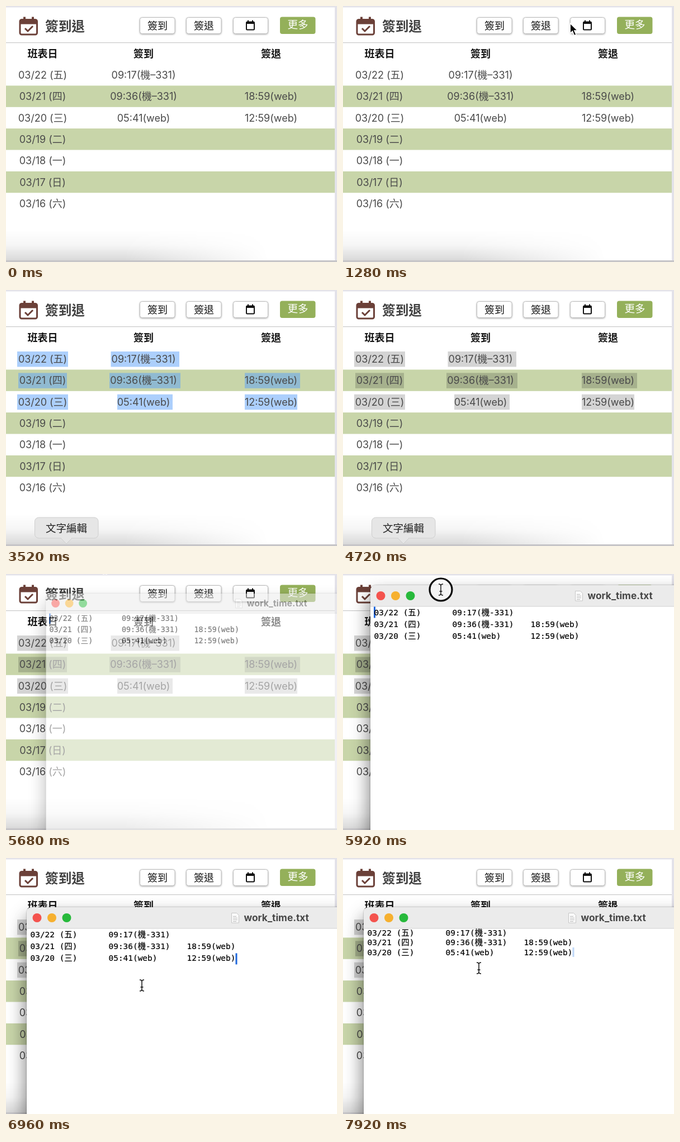
Animation, 592 px wide and 458 px high, one loop 8000 ms. Source, as an HTML page:

```html
<!DOCTYPE html>
<html lang="zh-Hant">
<head>
<meta charset="utf-8">
<title>簽到退</title>
<style>
  html, body { margin: 0; width: 100%; height: 100%; overflow: hidden; background: #fff; }
  svg { display: block; width: 592px; height: 458px; }
  text { font-family: Inter, "Noto Sans CJK TC", "Noto Sans CJK JP", sans-serif; white-space: pre; }
  .mono text { font: 14.45px "DejaVu Sans Mono", "Noto Sans CJK TC", "Noto Sans CJK JP", monospace; fill: #000; stroke: #000; stroke-width: .2; }
  .button { fill: #fff; stroke: #bcbcbc; filter: drop-shadow(0 1px 1.5px #0005); }
  .frame { filter: drop-shadow(0 18px 17px rgba(0, 0, 0, .42)) drop-shadow(0 0 1px rgba(0, 0, 0, .4)); }
  .bubble rect, .bubble path { fill: #e6e6e6; stroke: #cecece; }
</style>
</head>
<body>
<svg viewBox="0 0 592 458">
  <defs>
    <linearGradient id="rise" x2="0" y2="1">
      <stop offset="0" stop-color="#000" stop-opacity="0"/>
      <stop offset=".5" stop-color="#000" stop-opacity=".035"/>
      <stop offset="1" stop-color="#000" stop-opacity=".15"/>
    </linearGradient>
    <linearGradient id="fade">
      <stop offset=".45" stop-color="#fff"/>
      <stop offset="1" stop-color="#fff" stop-opacity="0"/>
    </linearGradient>
    <mask id="side"><rect y="395" width="470" height="62" fill="url(#fade)"/></mask>
  </defs>

  <rect width="592" height="458" fill="#e3e2e9"/>
  <rect y="2.5" width="588" height="452.5" fill="#fff"/>
  <rect y="400" width="470" height="55" fill="url(#rise)" mask="url(#side)"/>
  <rect y="455" width="592" height="3" fill="#c6c5c8"/>
  <rect y="65" width="588" height="1.2" fill="#c8c8c8"/>
  <g id="stripes" fill="#c8d5a9"></g>
  <g id="marks"></g>

  <g fill="none" stroke="#6b4038" stroke-width="3">
    <rect x="25" y="24.5" width="30.5" height="26.5" rx="3"/>
    <path d="M25 29h30.5" stroke-width="7"/>
    <path d="M33 19.5v6M48 19.5v6" stroke-width="4"/>
    <path d="M34 40l5 5 9-9"/>
  </g>
  <rect class="button" x="239.5" y="20.5" width="62.5" height="29" rx="4"/>
  <rect class="button" x="322.5" y="20.5" width="62.5" height="29" rx="4"/>
  <rect class="button" x="406.5" y="20.5" width="62" height="29" rx="4"/>
  <rect x="490" y="19.5" width="63.5" height="30.5" rx="4" fill="#94b05a"/>
  <g fill="none" stroke="#111" stroke-width="2">
    <rect x="430" y="28.5" width="14" height="14" rx="1.5"/>
    <path d="M430 30h14" stroke-width="4"/>
    <path d="M433 25.5v4M441 25.5v4"/>
  </g>
  <g id="labels"></g>

  <g id="otherTip" class="bubble">
    <rect x="-57.5" y="407" width="114" height="37" rx="7"/>
  </g>
  <g id="editTip" class="bubble">
    <path d="M97 443l11 11 11-11"/>
    <rect x="51.5" y="407" width="113.5" height="37" rx="7"/>
    <path d="M99 443h18v2h-18z" style="stroke:none"/>
  </g>

  <g id="window">
    <rect id="frame" class="frame" width="720" height="620" rx="10" fill="#fff"/>
    <path d="M0 38V10Q0 0 10 0H720V38z" fill="#ebebeb"/>
    <rect y="37.5" width="720" height="1" fill="#d2d2d2"/>
    <g id="lights">
      <circle cx="18.5" cy="19" r="8"/><circle cx="45" cy="19" r="8"/><circle cx="71.5" cy="19" r="8"/>
    </g>
    <circle id="dirtyDot" cx="18.5" cy="19" r="3" fill="#7c1411"/>
    <path d="M366.500 10.500h9l4 4v13.500h-13z" fill="#fafafa" stroke="#c6c6c6"/>
    <path d="M369 16.500h6M369 19.500h8M369 22.500h8M369 25.500h6" stroke="#b8b8b8"/>
    <g id="titleBar"></g>
    <rect id="caret" width="3"/>
    <g id="note" class="mono"></g>
  </g>

  <circle id="ring" r="20" fill="#fff" fill-opacity=".45" stroke="#0a0a0a" stroke-width="3.2"/>
  <g id="pointer">
    <path id="arrow" d="M0 0v17.500l4-3.800 3.300 7.800 3.200-1.400-3.300-7.500h5.600z" fill="#000" stroke="#fff" stroke-width="1.300"/>
    <g id="beam" fill="none">
      <path d="M-4-10q4 0 4 3v14q0 3-4 3M4-10q-4 0-4 3v14q0 3 4 3M-2.500 3h5" stroke="#fff" stroke-width="3.500"/>
      <path d="M-4-10q4 0 4 3v14q0 3-4 3M4-10q-4 0-4 3v14q0 3 4 3M-2.500 3h5" stroke="#111" stroke-width="1.500"/>
    </g>
  </g>
</svg>
<script>
const LOOP = 8000, STEP = 80;
const $ = id => document.getElementById(id);
const clamp = (v, lo, hi) => Math.min(hi, Math.max(lo, v));
const between = (t, a, b) => t >= a && t < b;

function add(parent, tag, attrs, content = '') {
  const el = document.createElementNS('http://www.w3.org/2000/svg', tag);
  for (const key in attrs) el.setAttribute(key, attrs[key]);
  el.textContent = content;
  return parent.appendChild(el);
}
function set(el, attrs) {
  for (const key in attrs) el.setAttribute(key, attrs[key]);
}
const show = (el, on) => { el.style.display = on ? '' : 'none'; };

// Text centred on (x, y)
function label(parent, content, x, y, size, fill, weight = 400) {
  return add(parent, 'text', {
    x, y: y + size * .37, 'font-size': size, fill, 'font-weight': weight, 'text-anchor': 'middle'
  }, content);
}

const labels = $('labels');
label(labels, '簽到退', 105.5, 36.5, 23.7, '#404040', 700);
label(labels, '簽到', 271, 35.5, 18, '#111', 500);
label(labels, '簽退', 354, 35.5, 18, '#111', 500);
label(labels, '更多', 522, 33.5, 18.5, '#fff');
const COLUMNS = [65.5, 246, 474];
['班表日', '簽到', '簽退'].forEach((s, i) => label(labels, s, COLUMNS[i], 85, 18, '#111', 700));

const ROW = 38.35, rowY = i => 123.3 + ROW * i;
[
  ['03/22 (五)', '09:17(機–331)', ''],
  ['03/21 (四)', '09:36(機–331)', '18:59(web)'],
  ['03/20 (三)', '05:41(web)', '12:59(web)'],
  ['03/19 (二)'], ['03/18 (一)'], ['03/17 (日)'], ['03/16 (六)']
].forEach((cells, i) => {
  if (i % 2) add($('stripes'), 'rect', { y: rowY(i) - 19.2, width: 588, height: ROW });
  cells.forEach((s, c) => label(labels, s, COLUMNS[c], rowY(i), 18, '#4a4a4a'));
});

// Selected cells: row, left, right
const marks = [
  [0, 20, 111], [0, 187.5, 310],
  [1, 22, 109], [1, 185, 312], [1, 427, 526],
  [2, 20, 111], [2, 199, 298], [2, 427, 521]
].map(([row, left, right]) => ({
  row, left, right,
  el: add($('marks'), 'rect', { y: rowY(row) - 13.3, height: 27.5 })
}));
const BLUE = 'rgba(90,160,250,.5)', GRAY = 'rgba(0,0,0,.17)';
const titleMark = add($('marks'), 'rect', { x: 70, y: 18, height: 36, fill: BLUE });

label($('editTip'), '文字編輯', 108, 426, 18.5, '#222');
label($('otherTip'), '計算機', 14, 426, 18.5, '#222');

add($('titleBar'), 'text', { x: 388.5, y: 24.5, 'font-size': 17.3, 'font-weight': 700, fill: '#474747' }, 'work_time.txt');
const edited = add($('titleBar'), 'text', { x: 513, y: 24.5, 'font-size': 16, fill: '#9a9a9a' }, '— 已編輯');

const noteLines = [
  ['03/22 (五)', '09:17(機-331)'],
  ['03/21 (四)', '09:36(機-331)', '18:59(web)'],
  ['03/20 (三)', '05:41(web)', '12:59(web)']
].map(cells => cells.map((s, i) => add($('note'), 'text', { x: 6.5 + 140 * i }, s)));

// Each entry: time, x, y
const POINTER = [
  [0, 40, -40], [80, 40, 12], [320, 20, 120], [560, 60, 300], [720, 250, 160],
  [880, 540, 45], [960, 535, 30], [1120, 490, 30], [1200, 490, 30],
  [1600, 72, 36], [1760, 143, 38], [2080, 504, 188], [2320, 519.5, 193.5],
  [2480, 547, 222], [2560, 547, 222], [2720, 400, 200], [2880, 200, 165],
  [3040, 10, 97], [3120, 17, 122], [3200, 17, 122], [3520, 108, 475],
  [3600, 108, 475], [3840, 60, 127], [4160, 30, 475], [4720, 100, 475],
  [5120, 20, -30], [5600, 178, -30], [5840, 175, 28], [5920, 175, 28],
  [6320, 161, 94], [6400, 168, 101], [6640, 243, 228], [7680, 243, 228],
  [7920, 243, 197], [8000, 243, 197]
];
const WINDOW = [[0, 49, 20], [5920, 49, 20], [6320, 37, 88], [8000, 37, 88]];

function at(track, t) {
  const i = Math.max(1, track.findIndex(k => k[0] >= t));
  const [t0, x0, y0] = track[i - 1], [t1, x1, y1] = track[i];
  const p = (t - t0) / (t1 - t0);
  return [x0 + (x1 - x0) * p, y0 + (y1 - y0) * p];
}

function drawSelection(t, x, y) {
  const titleWidth = t < 1600 || t >= 2480 ? 0 : t < 1760 ? clamp(x - 70, 0, 71) : 71;
  set(titleMark, { width: titleWidth });

  const row = t < 2640 ? 9 : t >= 3120 ? -1 : Math.floor((y - 104) / ROW);
  for (const m of marks) {
    const left = m.row > row ? m.left : m.row === row ? clamp(x, m.left, m.right) : m.right;
    set(m.el, { x: left, width: m.right - left, fill: t < 4720 ? BLUE : GRAY });
  }
}

function drawWindow(t) {
  const [x, y] = at(WINDOW, t);
  const open = clamp((t - 5520) / 320, 0, 1);
  const scale = .7 + .3 * (1 - (1 - open) ** 2);
  show($('window'), t >= 5600);
  set($('window'), {
    opacity: open,
    transform: `translate(${x + 300 * (1 - scale)} ${y + 200 * (1 - scale)}) scale(${scale})`
  });

  const inactive = between(t, 6880, 6960);
  ['#f4534e', '#f6b02f', '#27b93b'].forEach((c, i) =>
    set($('lights').children[i], { fill: inactive ? '#cfcfcf' : c }));

  const compact = t >= 7200;
  const first = compact ? 45.5 : 48.5, pitch = compact ? 17.5 : 21.2;
  noteLines.forEach((line, i) => line.forEach(el => set(el, { y: first + pitch * i + 5 })));

  const atEnd = t >= 6560;
  set($('caret'), {
    x: atEnd ? 373.5 : 6,
    y: atEnd ? first + pitch * 2 - 8.5 : 38.5,
    height: compact ? 17 : 20,
    fill: t >= 7920 ? '#bfd8f8' : '#1f68dc'
  });

  const dirty = clamp((t - 7120) / 320, 0, 1) * clamp((7920 - t) / 240, 0, 1);
  set(edited, { opacity: dirty });
  set($('dirtyDot'), { opacity: dirty });
}

function draw(time) {
  const t = Math.floor(time / STEP) * STEP;
  const [x, y] = at(POINTER, t);
  drawSelection(t, x, y);
  drawWindow(t);

  show($('editTip'), between(t, 3440, 3680) || between(t, 4560, 4800));
  show($('otherTip'), between(t, 4320, 4560));

  const beam = between(t, 1520, 3280) || between(t, 3840, 3920) || between(t, 5680, 6080) || t >= 6480;
  show($('beam'), beam);
  show($('arrow'), !beam);
  set($('pointer'), { transform: `translate(${x} ${y})` });
  show($('ring'), between(t, 5920, 6240));
  set($('ring'), { cx: x, cy: y });
}

let start;
function tick(now) {
  start ??= now;
  draw((now - start) % LOOP);
  requestAnimationFrame(tick);
}
draw(0);
requestAnimationFrame(tick);
</script>
</body>
</html>
```
